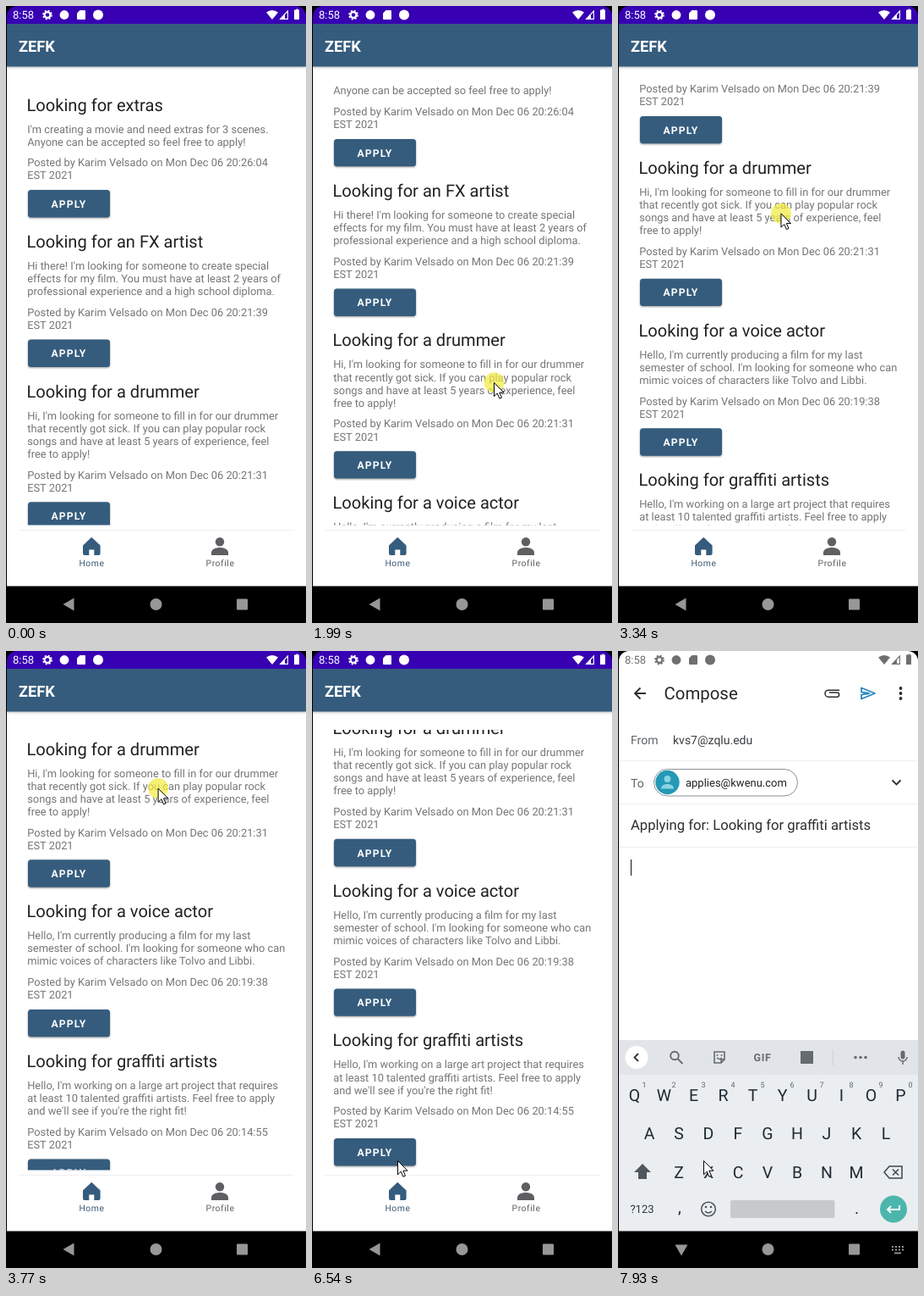
An HTML page that plays this animation: 355 px wide and 728 px high, repeating every 8 s.

```html
<!DOCTYPE html>
<html lang="en">
<head>
<meta charset="utf-8">
<title>Job board</title>
<style>
html, body { margin: 0; width: 355px; height: 728px; overflow: hidden; background: #000; }
svg { display: block; font-family: Roboto, sans-serif; text-rendering: geometricPrecision; }
text { white-space: pre; }
.title { font-size: 20.1px; fill: #212121; }
.body { font-size: 12.85px; fill: #757575; }
.apply { font-size: 12.2px; font-weight: 600; letter-spacing: 1.1px; fill: #fff; }
.btn { fill: #355c7d; filter: drop-shadow(0 1px 1px rgba(0, 0, 0, .4)); }
.tab { font-size: 10.4px; letter-spacing: .55px; text-anchor: middle; }
.line { fill: none; stroke-width: 1.8; }
.key { font-size: 19.5px; text-anchor: middle; fill: #1f2a33; }
.hint { font-size: 9px; text-anchor: middle; fill: #5f686f; }
</style>
</head>
<body>
<svg id="stage" width="355" height="728" viewBox="0 0 355 728"></svg>
<script>
const BLUE = '#355c7d', GREY = '#666b70';
const JOBS = [
  ['extras', '20:26:04', "I'm creating a movie and need extras for 3 scenes.",
    'Anyone can be accepted so feel free to apply!'],
  ['an FX artist', '20:21:39', "Hi there! I'm looking for someone to create special",
    'effects for my film. You must have at least 2 years of',
    'professional experience and a high school diploma.'],
  ['a drummer', '20:21:31', "Hi, I'm looking for someone to fill in for our drummer",
    'that recently got sick. If you can play popular rock',
    'songs and have at least 5 years of experience, feel', 'free to apply!'],
  ['a voice actor', '20:19:38', "Hello, I'm currently producing a film for my last",
    "semester of school. I'm looking for someone who can",
    'mimic voices of characters like Tolvo and Libbi.'],
  ['graffiti artists', '20:14:55', "Hello, I'm working on a large art project that requires",
    'at least 10 talented graffiti artists. Feel free to apply',
    "and we'll see if you're the right fit!"]
];

const text = (x, y, s, cls, extra = '') => `<text x="${x}" y="${y}" class="${cls}" ${extra}>${s}</text>`;
const rect = (x, y, w, h, fill, extra = '') =>
  `<rect x="${x}" y="${y}" width="${w}" height="${h}" fill="${fill}" ${extra}/>`;
const dot = (x, y, r, fill, extra = '') => `<circle cx="${x}" cy="${y}" r="${r}" fill="${fill}" ${extra}/>`;
const shape = (d, fill, extra = '') => `<path d="${d}" fill="${fill}" ${extra}/>`;
const line = (d, stroke, extra = '') => `<path class="line" d="${d}" stroke="${stroke}" ${extra}/>`;
const sized = (px, fill) => `style="font-size:${px}px;fill:${fill}"`;

function jobList() {
  const step = 15.1;
  let y = 123, out = '';
  for (const [what, time, ...lines] of JOBS) {
    out += text(24.5, y + 0.5, 'Looking for ' + what, 'title');
    let b = y + 26.5;
    for (const s of lines) { out += text(25.2, b, s, 'body'); b += step; }
    b += 9.6;
    out += text(25.2, b, `Posted by Karim Velsado on Mon Dec 06 ${time}`, 'body');
    out += text(25.2, b + step, 'EST 2021', 'body');
    const top = b + step + 12.6;
    out += rect(26, top, 97, 32.4, BLUE, 'rx="3.5" class="btn"') + text(53.4, top + 20.8, 'APPLY', 'apply');
    y = top + 67.5;
  }
  return out;
}

function statusBar(ink) {
  return text(8, 15, '8:58', '', sized(13, ink)) +
    dot(49, 10.5, 3.4, 'none', `stroke="${ink}" stroke-width="2.2"`) +
    dot(49, 10.5, 5.1, 'none', `stroke="${ink}" stroke-width="1.6" stroke-dasharray="2.2 1.8"`) +
    dot(69, 10.5, 5.4, ink) +
    shape('M87.5 5H93a1 1 0 0 1 1 1v9a1 1 0 0 1-1 1h-8a1 1 0 0 1-1-1V8.5z', ink) +
    dot(109, 10.5, 6, ink) +
    shape('M308 7.5a11 11 0 0 1 14 0L315 16z', ink) +
    line('M333.4 6V15.4H324.5z', ink, 'style="stroke-width:1.1"') + shape('M330 9.5V15.5H324z', ink) +
    shape('M342.5 4.5h1v-1h2v1h1.5v11.5h-6V4.5z', ink);
}

function homePage() {
  return rect(0, 0, 355, 728, '#fff') +
    rect(0, 21, 355, 50.5, BLUE, 'style="filter:drop-shadow(0 1px 1.5px rgba(0,0,0,.28))"') +
    rect(0, 0, 355, 21, '#3700b3') + statusBar('#fff') +
    text(15, 53.5, 'ZEFK', '', 'style="font-size:18.2px;font-weight:600;fill:#fff"') +
    `<g clip-path="url(#view)"><g id="list">${jobList()}</g></g>` +
    rect(15, 618, 326, 1, '#f0f0f0') +
    shape('M91 636.5l10.3-9.7 10.3 9.7v9.5a2 2 0 0 1-2 2h-5.3v-6.500h-6V648h-5.300a2 2 0 0 1-2-2z', BLUE) +
    text(101.5, 661, 'Home', 'tab', 'fill="#3d5a73"') +
    dot(253, 632.3, 5.2, '#5f5f63') + shape('M243 648v-3c0-4 5-6 10-6s10 2 10 6v3z', '#5f5f63') +
    text(253.5, 661, 'Profile', 'tab', 'fill="#606060"');
}

function mailPage() {
  const ink = '#2b2f33';
  return rect(0, 0, 355, 728, '#fff') + statusBar('#6f6f6f') +
    line('M33 50H20M26.5 43.5L20 50l6.5 6.5', ink) +
    text(54.5, 57, 'Compose', '', sized(20.4, '#25282b')) +
    line('M262 46.2h-13a4 4 0 0 0 0 8h10.5a2.7 2.7 0 0 0 0-5.3h-9.5', ink, 'style="stroke-width:1.5"') +
    line('M288 43.5l16 6.5-16 6.5v-4.8l9-1.7-9-1.7z', '#2388bd', 'stroke-linejoin="round"') +
    [44, 50, 56].map(y => dot(334.5, y, 1.9, ink)).join('') +
    text(15, 110, 'From', '', sized(14.1, '#5f6368')) +
    text(65, 110, 'kvs7@zqlu.edu', '', sized(14, '#3a3d40')) +
    [129, 180, 231].map(y => rect(1, y, 354, 1, '#efefef')).join('') +
    text(15, 160.5, 'To', '', sized(14.1, '#5f6368')) +
    rect(42.5, 139.5, 170, 31.5, '#fff', 'rx="15.75" stroke="#8b8f93"') +
    dot(58.5, 155, 14.2, '#2499b5') + dot(58.5, 151, 3.9, '#8bd3e2') +
    shape('M51 162.5c0-4 4-5.5 7.5-5.5s7.5 1.5 7.5 5.5z', '#8bd3e2') +
    text(80, 159.5, 'applies@kwenu.com', '', sized(13, '#222')) +
    line('M324.5 152.5l5 5 5-5', ink) +
    text(15, 211, 'Applying for: Looking for graffiti artists', '', sized(16.65, '#2b2e31')) +
    rect(15, 246, 1, 19, '#111');
}

function keyboard() {
  const row = (keys, x, y, gap) => [...keys].map((k, i) => text(x + gap * i, y, k, 'key')).join('');
  return rect(0, 459, 355, 226, '#eaeef1') + rect(0, 459, 355, 41, '#e1e5e9') +
    dot(22, 479.5, 13.5, '#fff') + line('M24 475l-4.5 4.5 4.5 4.5', '#333') +
    dot(67, 477.5, 4.8, 'none', `stroke="${GREY}" stroke-width="1.9"`) + line('M70.5 481l6 6', GREY) +
    line('M114 473h12v9l-4 4h-8zM126 482h-4v4M117 480q3 3 6 0', GREY, 'style="stroke-width:1.6"') +
    dot(117.5, 477, 1, GREY) + dot(122.5, 477, 1, GREY) +
    text(171, 484, 'GIF', '', `style="font-size:12.5px;font-weight:700;letter-spacing:.6px;text-anchor:middle;fill:${GREY}"`) +
    rect(216, 472, 15, 15, GREY) + rect(254, 470, 1, 19, '#cdd2d6') +
    [281, 287, 293].map(x => dot(x, 479.5, 1.8, GREY)).join('') +
    rect(334.5, 471.5, 5, 10, GREY, 'rx="2.5"') + line('M332 479a5 5 0 0 0 10 0M337 484v4', GREY, 'style="stroke-width:1.5"') +
    row('QWERTYUIOP', 19.5, 531, 35) +
    [...'1234567890'].map((k, i) => text(31 + 35 * i, 515, k, 'hint')).join('') +
    row('ASDFGHJKL', 37, 576, 35) + row('ZXCVBNM', 72, 622, 35) +
    shape('M29 605l10 10h-5v8h-10v-8h-5z', '#4f585f') +
    line('M321 608h15v14h-15l-6-7zM325 611.5l7 7M332 611.5l-7 7', '#3c464d', 'style="stroke-width:1.5"') +
    text(28.5, 663, '?123', '', 'style="font-size:13px;text-anchor:middle;fill:#2d373f"') +
    text(73, 663, ',', 'key') + text(282.5, 664, '.', 'key') +
    dot(107, 658.5, 8.3, 'none', 'stroke="#4f585f" stroke-width="1.6"') +
    dot(104, 656, 1.3, '#4f585f') + dot(110, 656, 1.3, '#4f585f') +
    line('M103 661q4 4 8 0', '#4f585f', 'style="stroke-width:1.6"') +
    rect(133, 648, 123.5, 21, '#c6cacd', 'rx="2"') +
    dot(326, 658.5, 16, '#4db6ac') + line('M333 654v5h-14M323 655l-4 4 4 4', '#fff');
}

function navBar() {
  const ink = '#979797';
  let keys = '';
  for (let i = 0; i < 8; i++) keys += rect(324 + i % 4 * 4, 702 + (i >> 2) * 3.5, 2, 2, ink);
  return rect(0, 684.5, 355, 44, '#000') +
    `<g id="back">${shape('M67.5 706l13-7.5v15z', ink)}</g>` +
    dot(177.5, 706, 7, ink) + rect(273, 699.5, 13, 13, ink, 'rx="1"') +
    `<g id="keysIcon">${keys}${rect(327, 709.5, 8, 1.8, ink)}</g>`;
}

document.getElementById('stage').innerHTML =
  '<clipPath id="view"><rect x="15" y="93" width="326" height="519.5"/></clipPath>' +
  homePage() + `<g id="mail">${mailPage()}</g><g id="keys">${keyboard()}</g>` + navBar() +
  '<g id="pointer">' + dot(0.5, 0.5, 12, '#f2eb3c', 'id="press" opacity=".7"') +
  shape('M.5 .5V16.8L4.3 13.2 6.9 19.3 9.5 18.2 6.9 12.2H12z', '#fff', 'stroke="#000" stroke-linejoin="round"') + '</g>' +
  shape('M0 0H355V12A12 12 0 0 0 343 0H13A12 12 0 0 0 1 12V728H0z', '#000');

// Monotone cubic curve through rows of [time, value, value...].
function track(rows) {
  return (t, col = 1) => {
    const last = rows.length - 1;
    if (t <= rows[0][0]) return rows[0][col];
    if (t >= rows[last][0]) return rows[last][col];
    const slope = i => i < 0 || i >= last ? 0 : (rows[i + 1][col] - rows[i][col]) / (rows[i + 1][0] - rows[i][0]);
    const tangent = i => {
      const a = slope(i - 1), b = slope(i);
      return a * b > 0 ? 2 * a * b / (a + b) : 0;
    };
    const i = rows.findIndex(r => r[0] > t) - 1;
    const dt = rows[i + 1][0] - rows[i][0], u = (t - rows[i][0]) / dt, v = 1 - u;
    return rows[i][col] * v * v * (1 + 2 * u) + rows[i + 1][col] * u * u * (1 + 2 * v) +
      dt * u * v * (tangent(i) * v - tangent(i + 1) * u);
  };
}

const pointerAt = track([
  [270, 332, 728], [600, 268, 565], [880, 227, 497], [1070, 221, 516], [1320, 221, 516],
  [1990, 215, 444], [2740, 209, 327], [3340, 192.5, 244.5], [4120, 174, 123], [4450, 174, 123],
  [4950, 165, 175.5], [5110, 162, 228], [5550, 147, 385], [5940, 133, 499], [6540, 101, 601]
]);
const scrollAt = track([[1370, 0], [1990, 60], [2740, 173], [3340, 263.5], [4050, 363.5]]);

const el = id => document.getElementById(id);
const [list, mail, keys, back, keysIcon, pointer, press] =
  ['list', 'mail', 'keys', 'back', 'keysIcon', 'pointer', 'press'].map(el);
const ramp = (t, from, to) => Math.min(1, Math.max(0, (t - from) / (to - from)));
const easeOut = u => 1 - (1 - u) ** 3;
const show = (node, on) => node.setAttribute('visibility', on ? 'visible' : 'hidden');
const move = (node, value) => node.setAttribute('transform', value);

function draw(now) {
  const t = now % 8000;
  move(list, `translate(0 ${-scrollAt(t)})`);

  const scale = 0.9 + 0.1 * easeOut(ramp(t, 7060, 7460));
  mail.setAttribute('opacity', ramp(t, 7060, 7150));
  move(mail, `translate(178 342) scale(${scale}) translate(-178 -342)`);

  const rise = easeOut(ramp(t, 7690, 7920));
  show(keys, rise > 0);
  move(keys, `translate(0 ${226 * (1 - rise)})`);
  move(back, `rotate(${-90 * rise} 75 706)`);
  keysIcon.setAttribute('opacity', rise);

  show(pointer, t >= 290);
  move(pointer, `translate(${pointerAt(t, 1)} ${pointerAt(t, 2)})`);
  const down = t >= 1200 && t < 4330 || t >= 6900 && t < 7040;
  press.style.display = down ? '' : 'none';
  requestAnimationFrame(draw);
}
draw(performance.now());
</script>
</body>
</html>
```
